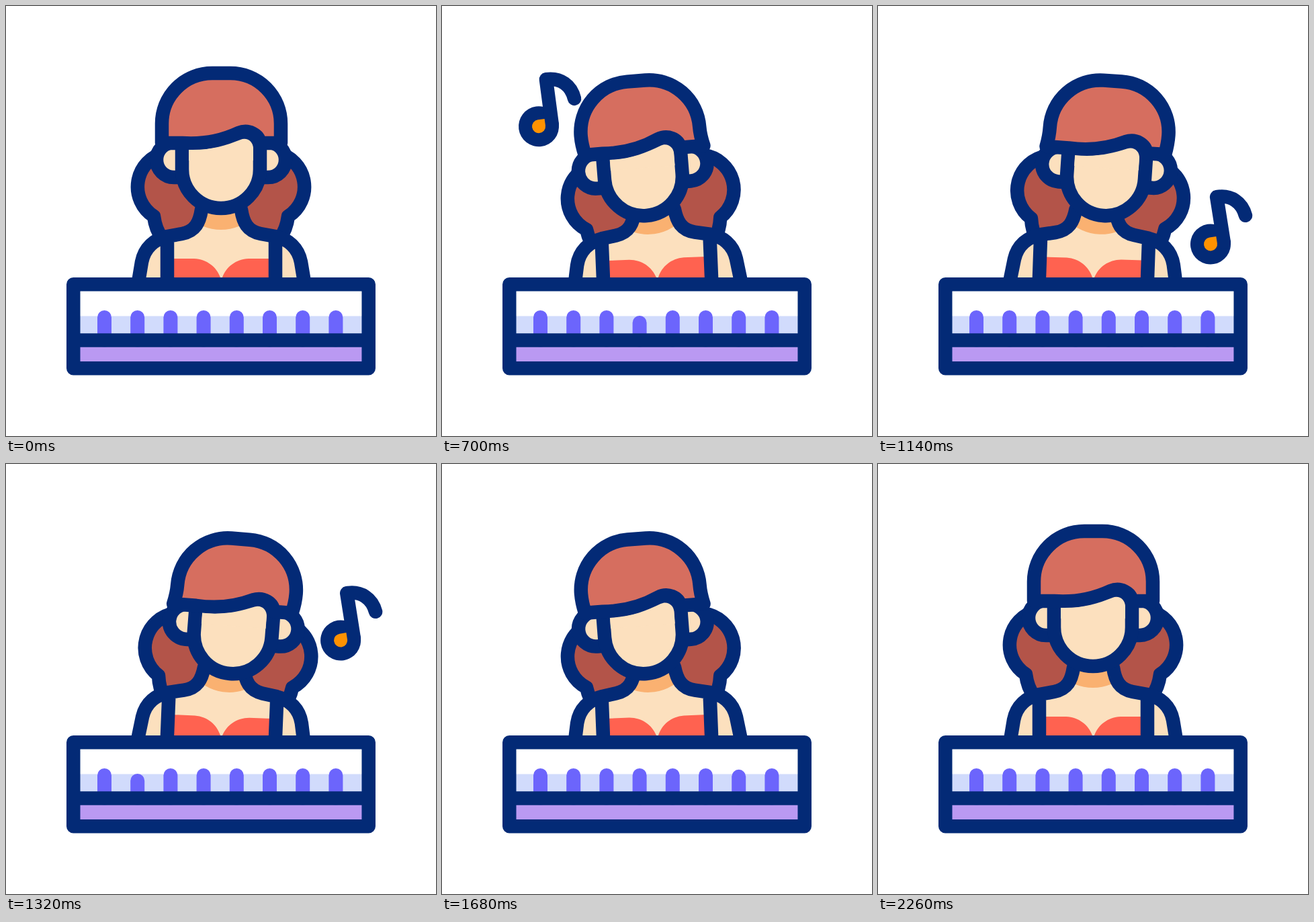
Recreate the animation shown at these times as an HTML page. Size 640 by 640 pixels, loop 2580 ms.

```html
<!DOCTYPE html>
<html lang="en">
<head>
<meta charset="utf-8">
<title>Keyboard player</title>
<style>
html, body { margin: 0; height: 100%; overflow: hidden; background: #fff; }
svg { display: block; width: 100vw; height: 100vh; }
.line { fill: none; stroke: #032a76; stroke-width: 20.5; stroke-linecap: round; stroke-linejoin: round; }
.skin { fill: #fce0be; }
.hair { fill: #d66e5f; }
</style>
</head>
<body>
<svg viewBox="0 0 640 640">
  <defs>
    <g id="note">
      <circle r="30" fill="#032a76"/>
      <path class="line" d="M20 0V-68C42 -68 56 -54 58 -34"/>
      <path fill="#ff9200" d="M0 -10H10V0A10 10 0 1 1 0 -10Z"/>
    </g>
    <g id="tail">
      <path fill="#b35449" d="M236 218.500A52 52 0 0 0 220 313C222 328 226 337 232 345H286V218Z"/>
      <path class="line" d="M236 218.500A52 52 0 0 0 220 313C222 328 226 337 232 345"/>
    </g>
    <path id="side" class="line" d="M195.500 420L202 381C206 360 221 347 240 343L262 339C282 335 288 322 291 303M240 345V420"/>
    <path id="ear" class="line skin" d="M262 203H250A26 26 0 0 0 250 255H262"/>
    <path id="torso" d="M195.500 420L202 381C206 360 221 347 240 343L262 339C282 335 288 322 291 303V280H350V303C353 322 359 335 379 339L401 343C420 347 435 360 439 381L445.500 420Z"/>
    <clipPath id="skinClip"><use href="#torso"/></clipPath>
  </defs>

  <use id="note0" href="#note"/>
  <use id="note1" href="#note"/>

  <g id="tails">
    <use href="#tail"/>
    <use href="#tail" transform="matrix(-1 0 0 1 640 0)"/>
  </g>

  <g id="body">
    <use href="#torso" class="skin"/>
    <g clip-path="url(#skinClip)"><circle id="shade" cx="320" cy="263" r="70" fill="#fab171"/></g>
    <path fill="#ff6250" d="M240 420V376H280C299 377 313 388 319 404Q320.500 408 322 404C328 388 342 377 361 376H401V420Z"/>
    <use href="#side"/>
    <use href="#side" transform="matrix(-1 0 0 1 641 0)"/>
  </g>

  <g id="head">
    <use href="#ear"/>
    <use href="#ear" transform="matrix(-1 0 0 1 640 0)"/>
    <path class="line skin" d="M262 204V243A58 58 0 0 0 378 243V205L357 188L320 200Z"/>
    <path id="cap" class="line hair"/>
    <path class="skin" d="M272 230V214C304 215 326 208 349 199C359 195 368 202 368 212V230Z"/>
  </g>

  <path fill="#fff" d="M100 414H540V539H100Z"/>
  <path fill="#d1dbfc" d="M100 461.500H540V497H100Z"/>
  <path fill="#ba99f2" d="M100 498H540V539H100Z"/>
  <g id="keys" stroke="#6c65fc" stroke-width="21" stroke-linecap="round"></g>
  <path class="line" d="M100.250 414.300H539.700V539.200H100.250ZM100.250 497.500H539.700"/>
</svg>
<script>
const LOOP = 2580;
const $ = id => document.getElementById(id);
const clamp = x => Math.min(1, Math.max(0, x));
const smooth = x => (x = clamp(x), x * x * (3 - 2 * x));
const smoother = x => (x = clamp(x), x * x * x * (x * (6 * x - 15) + 10));

// [time, lean]: -1 is left, 1 is right
const leans = [[200, 0], [720, -1], [1220, 1], [1720, -1], [2260, 0]];
// [time of deepest point, key index]
const presses = [[380, 6], [700, 3], [990, 4], [1320, 1], [1560, 6]];
// Each note rises steadily while x follows a parabola around its turning time
const notes = [
  { start: 220, x: 109, bend: 9.26e-5, turn: 86, tilt: 2.2, spin: -0.0203 },
  { start: 1003, x: 494, bend: 2.8e-4, turn: 1200, tilt: -9, spin: 0 }
];

const keys = Array.from({ length: 8 }, (_, i) => {
  const key = document.createElementNS("http://www.w3.org/2000/svg", "line");
  const x = 146.5 + i * 49.2;
  key.setAttribute("x1", x);
  key.setAttribute("x2", x);
  key.setAttribute("y2", 497);
  return $("keys").appendChild(key);
});

function lean(t) {
  let value = 0;
  for (let i = 1; i < leans.length; i++) {
    const [t0, a] = leans[i - 1], [t1, b] = leans[i];
    if (t >= t0) value = a + (b - a) * smoother((t - t0) / (t1 - t0));
  }
  return value;
}

function pose(id, x, y, angle = 0, cx = 0, cy = 0) {
  $(id).setAttribute("transform", `translate(${x} ${y}) rotate(${angle} ${cx} ${cy})`);
}

// The lower ends of the cap trail behind the leaning head by sway
function capPath(sway) {
  return `M${232 + sway} 204Q232 188 232 175A75 75 0 0 1 307 100H334A75 75 0 0 1 409 175` +
    `Q409 188 ${409 + sway} 204H378C376 191 361 183 346 189C318 202 290 206 262 204Z`;
}

function draw(t) {
  const shift = lean(t), tilt = lean(t - 35);
  const drop = Math.min(smooth((t - 200) / 520), smooth((2260 - t) / 540));

  pose("head", 21.3 * shift, 11.2 * drop, 4.6 * tilt, 320, 229);
  $("cap").setAttribute("d", capPath(-4 * tilt));
  pose("tails", 10 * shift + 1.2 * drop, 11 * drop * drop, 5.3 * tilt, 320, 275);
  pose("body", 0, 0, 2.4 * tilt, 320, 405);
  pose("shade", 8 * shift, 6.5 * drop * drop);

  notes.forEach((n, i) => {
    const age = t - n.start;
    const x = n.x + n.bend * (t - n.turn) ** 2;
    pose("note" + i, x, 425 - 0.511 * age, n.tilt + n.spin * age);
    $("note" + i).setAttribute("opacity", Math.min(clamp(age / 70), clamp((640 - age) / 60)));
  });

  keys.forEach((key, i) => {
    let depth = 0;
    for (const [time, index] of presses) {
      const d = Math.abs(t - time) / 150;
      if (index === i && d < 1) depth = 8 * smooth(1.6 * (1 - d));
    }
    key.setAttribute("y1", 463.5 + depth);
  });
}

const begin = performance.now();
function tick() {
  draw((performance.now() - begin) % LOOP);
  requestAnimationFrame(tick);
}
tick();
</script>
</body>
</html>
```
